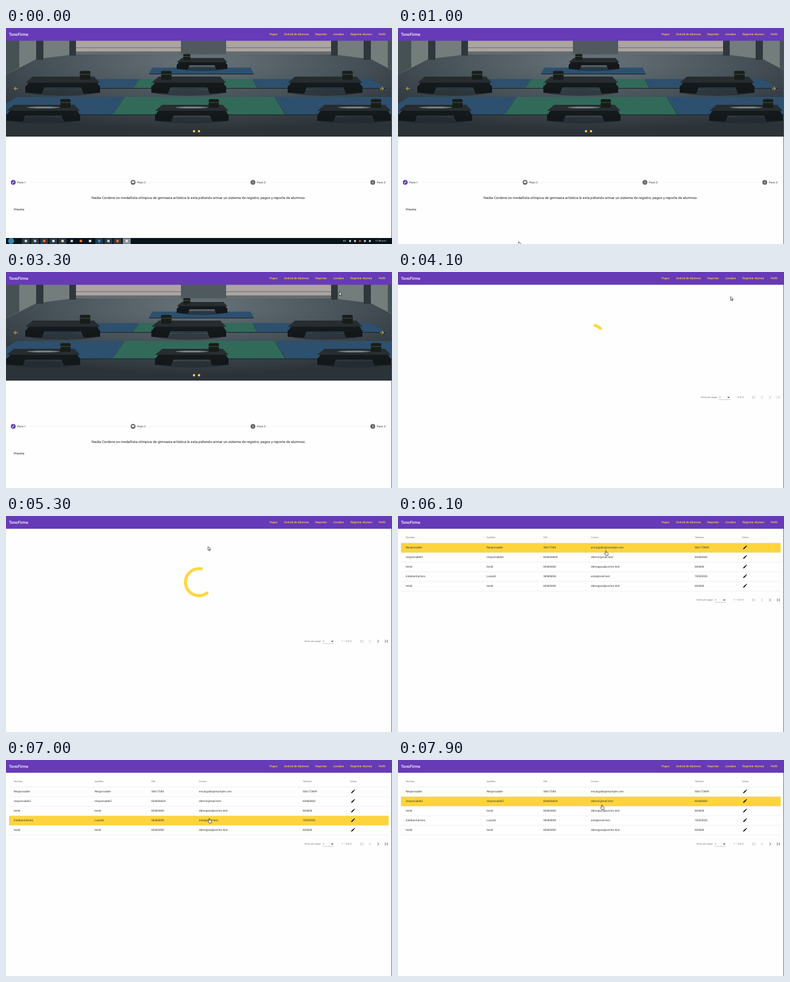
An HTML page that plays this animation: 640 by 360 pixels, repeating every 8 s.

```html
<!DOCTYPE html>
<html lang="es">
<head>
<meta charset="utf-8">
<title>TonoFirme</title>
<style>
html, body { margin: 0; width: 100%; height: 100%; overflow: hidden; background: #fefefe; }
svg { display: block; width: 640px; height: 360px; }
text { font: 4.67px Roboto, Arial, sans-serif; fill: #333; text-rendering: geometricPrecision; }
.nav text { font-weight: 500; fill: #ffd740; }
.small text, text.small { font-size: 4px; fill: #757575; }
.mid { text-anchor: middle; }
.intro { font-size: 5.95px; fill: #222; }
.brand { font-size: 6.67px; font-weight: 500; fill: #fff; }
.next { font-weight: 500; }
.tray text { font-size: 4px; fill: #fff; }
</style>
</head>
<body>
<svg viewBox="0 0 640 360">
  <defs>
    <radialGradient id="floor" cx=".5" cy=".22" r=".72">
      <stop stop-color="#68737a"/><stop offset=".55" stop-color="#475158"/><stop offset="1" stop-color="#2b3338"/>
    </radialGradient>
    <clipPath id="frame"><rect y="21" width="640" height="160"/></clipPath>
    <path id="pencil" d="M3 17.25V21h3.75L17.81 9.94l-3.75-3.75zM20.71 7.04a1 1 0 0 0 0-1.41l-2.34-2.34a1 1 0 0 0-1.41 0l-1.83 1.83 3.75 3.75z"/>
    <path id="back" d="M3 0H-3L0-3M-3 0L0 3" fill="none" stroke="#ffd740" stroke-width=".8"/>
    <path id="chevron" d="M-1.2-2.3L1.2 0-1.2 2.3" fill="none" stroke-width=".8"/>
    <path id="toEnd" d="M-2.2-2.3L.2 0-2.2 2.3M2.2-2.4V2.4" fill="none" stroke-width=".8"/>
  </defs>
  <rect width="640" height="360" fill="#fefefe"/>

  <g id="home">
    <g id="photo" clip-path="url(#frame)"></g>
    <use href="#back" x="16.5" y="101"/>
    <use href="#back" transform="translate(623 101) scale(-1 1)"/>
    <g fill="#ffd740"><circle cx="311.7" cy="172" r="1.9"/><circle cx="320" cy="172" r="1.9"/></g>
    <g id="steps"></g>
    <text class="mid intro" x="319.5" y="285.2">Nadia Cordeno ex medallista olímpica de gimnasia artística le esta pidiendo armar un sistema de registro, pagos y reporte de alumnos.</text>
    <text class="next" x="13" y="304.3">Próximo</text>
  </g>

  <g id="list">
    <circle id="spinner" cx="320" cy="110.3" r="22.5" fill="none" stroke="#ffd740" stroke-width="5" pathLength="360"/>
    <g id="table"></g>
    <g id="pager" class="small">
      <g id="size">
        <text x="495" y="1.4">Items per page:</text><text x="525.5" y="1.4">5</text>
        <path d="M538.8-.8h4.4l-2.2 2.2z" fill="#555"/>
        <path d="M525 3.9h19" stroke="#999" stroke-width=".5"/>
      </g>
      <text id="range" x="573" y="1.4" text-anchor="end"></text>
      <g stroke="#aaa">
        <use href="#toEnd" transform="translate(590.5) scale(-1 1)"/>
        <use href="#chevron" transform="translate(603.5) scale(-1 1)"/>
      </g>
      <g id="forward"><use href="#chevron" x="617"/><use href="#toEnd" x="630"/></g>
    </g>
  </g>

  <rect width="640" height="21.3" fill="#673ab7"/>
  <rect id="hover" x="540" y="4.3" width="27" height="13" rx="1.3" fill="#ffd740" opacity=".1"/>
  <text class="brand" x="5" y="13">TonoFirme</text>
  <g id="nav" class="nav"></g>
  <path d="M639.5 21V360" stroke="#555" stroke-width=".8"/>
  <g id="taskbar" class="tray"></g>
  <g id="cursor" stroke="#222" stroke-width=".7" fill="#fff" stroke-linejoin="round">
    <path id="arrow" d="M0 0v6.2l1.5-1.4 1 2.3 1.1-.5-1-2.2h2z"/>
    <path id="hand" d="M-.7 4V.6Q0-.4.7.6V3l2.6.6q.8.3.6 1.4L3.3 8H-.4L-2.3 4.8q.5-1 1.6 0z"/>
  </g>
</svg>
<script>
const LOOP = 8000, PAGE = 4000, LOADED = 4400, TABLE = 5600;
const ROW_TOP = 45, ROW_HEIGHT = 16;
const $ = id => document.getElementById(id);
const show = (id, on) => $(id).style.display = on ? '' : 'none';
const text = (x, y, s, attrs = '') => `<text x="${x}" y="${y}" ${attrs}>${s}</text>`;
const rect = (x, y, w, h, fill, attrs = '') =>
  `<rect x="${x}" y="${y}" width="${w}" height="${h}" fill="${fill}" ${attrs}/>`;
const dot = (x, y, r, fill) => `<circle cx="${x}" cy="${y}" r="${r}" fill="${fill}"/>`;
const poly = (points, fill) => `<polygon points="${points}" fill="${fill}"/>`;
const pencil = (x, y, scale, fill) =>
  `<use href="#pencil" fill="${fill}" transform="translate(${x} ${y}) scale(${scale})"/>`;

// Floor mat whose side edges run to a common vanishing point
function mat(left, right, top, bottom, fill) {
  const vx = 325, vy = -72, k = (bottom - vy) / (top - vy);
  const spread = x => vx + (x - vx) * k;
  const points = y => `${left} ${top} ${right} ${top} ${spread(right)} ${y} ${spread(left)} ${y}`;
  return poly(points(bottom + 1.3), '#1c282f') + poly(points(bottom), fill);
}

// Step bench around cx with a weight on one side: slab, two feet, shadow
function bench(cx, y, w, side) {
  const h = w * .23, foot = s => poly(
    [[.5, .55], [.5, .95], [.28, 1], [.24, .55]].map(([u, v]) => `${cx + s * u * w} ${y + v * h}`).join(' '), '#12171a');
  const slab = (v, fill) => poly(`${cx - w * .4} ${y} ${cx + w * .42} ${y} ${cx + w * .5} ${y + h * v} ${cx - w * .5} ${y + h * v}`, fill);
  const size = w * .14;
  return `<ellipse cx="${cx}" cy="${y + h * .92}" rx="${w * .45}" ry="${h * .2}" fill="#20282d" opacity=".6"/>`
    + foot(-1) + foot(1) + slab(.64, '#14191c') + slab(.36, '#262c2f')
    + rect(cx + side * w * .3 - size / 2, y - size * .55, size, size * .85, '#171d19', 'rx="2"')
    + rect(cx + side * w * .3 - size / 2, y - size * .25, size, 1, '#49503f');
}

function buildPhoto() {
  const blue = '#2d506e', green = '#326a59';
  const side = poly('0 21 105 21 105 45 50 52 0 78', '#737d7c') + poly('0 21 22 21 22 66 0 78', '#465154')
    + rect(50, 21, 12, 32, '#2f373b') + rect(105, 21, 11, 25, '#2f373b')
    + rect(116, 21, 174, 18, '#aaa5a1') + rect(116, 32, 174, 1.5, '#827d7b')
    + rect(116, 39, 174, 5, '#656c6f') + rect(290, 21, 38, 23, '#505a5e');
  let s = rect(0, 21, 640, 160, 'url(#floor)') + side + `<g transform="translate(655) scale(-1 1)">${side}</g>`
    + mat(243, 405, 66, 76, blue);
  const rows = [[85, 100, [80, 221, 409, 604]], [115, 144, [18, 197, 445, 640]]];
  for (const [top, bottom, x] of rows)
    for (let i = 0; i < 3; i++) s += mat(x[i], x[i + 1], top, bottom, i == 1 ? green : blue);
  s += bench(325, 50, 84, -1);
  [94, 303, 529].forEach((x, i) => s += bench(x, 81, 124, i == 1 ? -1 : 1));
  for (const x of [62, 308, 577])
    s += bench(x, 128, 122, 1) + `<ellipse cx="${x}" cy="132.5" rx="27" ry="1.5" fill="#778083"/>`;
  $('photo').innerHTML = s;
}

function buildSteps() {
  let s = '';
  for (let i = 0; i < 4; i++) {
    const x = 12 + 198.7 * i;
    s += dot(x, 257.3, 4, i ? '#666' : '#673ab7') + text(x + 6.7, 259, 'Paso ' + (i + 1));
    if (i == 0) s += pencil(x - 2.6, 254.7, .217, '#fff');
    else if (i == 1) s += rect(x - 2, 255.5, 4, 2.8, '#fff', 'rx=".6"');
    else s += text(x, 258.8, i + 1, 'class="mid" style="fill:#fff"');
    if (i < 3) s += rect(x + 25, 257.1, 166, .4, '#e4e4e4');
  }
  $('steps').innerHTML = s;
}

function buildTable() {
  const cols = [13, 147, 241, 320, 492, 571];
  const heads = ['Nombre', 'Apellido', 'DNI', 'Correo', 'Teléfono', 'Editar'];
  const trial = ['test6', 'test6', '60460460', 'demoguia@correo.test', '604604'];
  const rows = [
    ['Responsable', 'Responsable', '50617284', 'encargado@example.com', '506172849'],
    ['responsable2', 'responsable2', '604604604', 'demo2@mail.test', '60460460'],
    trial,
    ['EstebanCartero', 'Luzardi', '58585858', 'este@mail.test', '70555555'],
    trial];
  const rule = y => rect(5, y - .25, 629.5, .5, '#ddd');
  let s = heads.map((h, i) => text(cols[i], 37, h, 'class="small"')).join('');
  rows.forEach((row, r) => {
    const y = ROW_TOP + ROW_HEIGHT * r;
    s += rect(5, y, 629.5, ROW_HEIGHT, '#fdd43d', `id="row${r}"`) + rule(y)
      + row.map((v, i) => text(cols[i], y + 9.2, v)).join('')
      + pencil(571.3, y + 3, .35, '#111');
  });
  $('table').innerHTML = s + rule(ROW_TOP + ROW_HEIGHT * rows.length);
}

function buildBars() {
  const links = { Pagos: 437, 'Control de Alumnos': 461, Reportes: 513, Listados: 542.5, 'Registrar Alumno': 571, Perfil: 618 };
  $('nav').innerHTML = Object.entries(links).map(([s, x]) => text(x, 12.2, s)).join('');

  const colors = ['#d8d3b8', '#b9c4cc', '#e8702f', '#d9dde8'];
  let s = rect(0, 350, 640, 10, '#08131a') + dot(8.5, 355, 5, '#3b83a5');
  for (let i = 0; i < 12; i++) {
    const x = 33 + 15.2 * i, c = i == 8 ? '#2c8fd6' : colors[i % 4];
    if (i < 5 || i > 7) s += rect(x - 6.5, 350.5, 13, 9.5, i == 11 ? '#84919b' : '#2b3a44', 'rx="1"');
    s += i % 2 ? rect(x - 2, 353, 4, 4, c) : dot(x, 355, 2.3, c);
  }
  for (let i = 0; i < 5; i++) s += rect(569 + 8.2 * i, 353.5, 3, 3, i == 2 ? '#d65b50' : '#ddd');
  $('taskbar').innerHTML = s + text(559, 356.3, 'ES') + text(612, 356.3, '11:49 a.m.');
}

// Cursor tip: time, x, y
const path = [[1000, 200, 356], [2000, 555.5, 11], [2500, 555.5, 11], [3700, 551.5, 41], [4200, 551.5, 41],
  [5300, 335, 51], [6500, 348, 60], [7000, 337, 97], [7300, 338, 115], [7900, 338, 74.5]];

function cursorAt(t) {
  const i = Math.max(1, path.findIndex(p => p[0] >= t));
  const [t0, x0, y0] = path[i - 1], [t1, x1, y1] = path[i];
  const u = Math.max(0, (t - t0) / (t1 - t0)), e = u * u * (3 - 2 * u);
  return [x0 + (x1 - x0) * e, y0 + (y1 - y0) * e];
}

// cubic-bezier(.35, 0, .25, 1)
function ease(x) {
  let lo = 0, hi = 1, u;
  for (let i = 0; i < 20; i++) {
    u = (lo + hi) / 2;
    if (1.05 * (1 - u) ** 2 * u + .75 * (1 - u) * u * u + u ** 3 < x) lo = u; else hi = u;
  }
  return 3 * u * u - 2 * u ** 3;
}

// The arc grows at its head, then shrinks at its tail, while the ring turns
function spin(ms) {
  const half = Math.floor(ms / 500), e = ease(ms % 500 / 500), grow = half % 2 == 0;
  const start = 270 * (half >> 1) + (grow ? 0 : 270 * e) + ms * .18 - 90;
  const length = 18 + 270 * (grow ? e : 1 - e);
  $('spinner').setAttribute('stroke-dasharray', `${length} ${360 - length}`);
  $('spinner').setAttribute('transform', `rotate(${start % 360} 320 110.3)`);
}

function draw(t) {
  const [x, y] = cursorAt(t), table = t >= TABLE, loaded = t >= LOADED;
  const row = table ? Math.floor((y - ROW_TOP) / ROW_HEIGHT) : -1;
  const overNav = t >= 1900 && t < 2900, pointing = overNav || row >= 0;
  show('home', t < PAGE);
  show('list', t >= PAGE);
  show('table', table);
  show('spinner', !table);
  show('taskbar', t < 1000);
  show('hover', overNav);
  show('cursor', t >= 1000);
  show('hand', pointing);
  show('arrow', !pointing);
  $('cursor').setAttribute('transform', `translate(${x} ${y})`);
  for (let i = 0; i < 5; i++) show('row' + i, row == i);
  $('pager').setAttribute('transform', `translate(0 ${table ? 140 : 208.8})`);
  $('size').setAttribute('transform', `translate(${loaded ? 0 : 7} 0)`);
  $('range').textContent = loaded ? '1 – 5 of 5' : '0 of 0';
  $('forward').setAttribute('stroke', loaded ? '#444' : '#aaa');
  spin(Math.max(0, t - PAGE - 30));
}

buildPhoto();
buildSteps();
buildTable();
buildBars();
const began = performance.now();
function tick() {
  const t = (performance.now() - began) % LOOP;
  draw(Math.floor(t / 100) * 100);
  requestAnimationFrame(tick);
}
tick();
</script>
</body>
</html>
```
